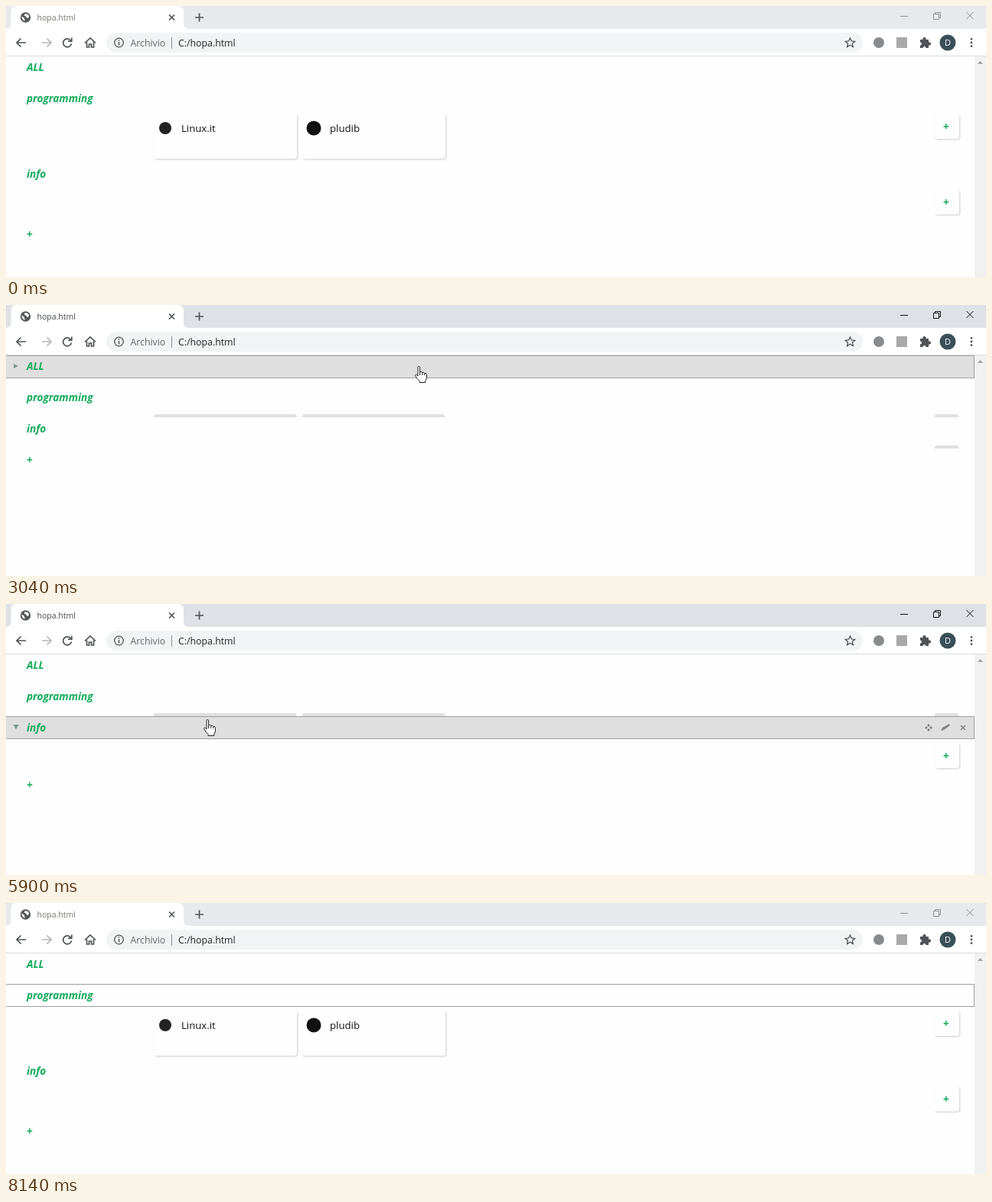
Write an HTML page that moves like this. It is 1280 by 355 pixels and loops after 8.33 s.

```html
<!DOCTYPE html>
<html lang="it">
<head>
<meta charset="utf-8">
<title>hopa.html</title>
<style>
  html, body { margin: 0; width: 100%; height: 100%; overflow: hidden; background: #fefefe; }
  #stage { display: block; width: 100vw; height: 100vh; font-family: "Open Sans", "Noto Sans", sans-serif; }
  .label, .plus { font-size: 13.6px; font-weight: 700; fill: #13ab5b; }
  .label { font-style: italic; }
  .plus { text-anchor: middle; }
  .card { fill: #fefefe; filter: drop-shadow(1px 1px 1px #ccc); }
  .name { font-size: 13.2px; fill: #111; }
  .url { font-size: 12.3px; }
  .line { fill: none; stroke: #505357; stroke-width: 1.7; }
  .thin { fill: none; stroke-width: 1; }
  .focus { fill: none; stroke: #a0a0a0; }
</style>
</head>
<body>
<svg id="stage" viewBox="0 0 1280 355" preserveAspectRatio="none">
  <rect width="1280" height="355" fill="#fefefe"/>

  <rect id="titlebar" width="1280" height="30"/>
  <path d="M0 30Q6.500 30 6.500 23V7Q6.500 0 14 0H224Q232 0 232 7V23Q232 30 239 30Z" fill="#fff"/>
  <circle cx="25.500" cy="15" r="6.700" fill="#55585c"/>
  <path d="M20 13.500L23.500 15.500L25 19.500L22 18.500ZM25 10L29.500 11.500L30 15L27.500 16L26 13.500L23.500 12.500Z" fill="#fff"/>
  <text id="tabTitle" x="40.500" y="18.800" font-size="10.500">hopa.html</text>
  <path class="line" d="M213 11.500l7 7m0-7l-7 7M247 15h11m-5.500-5.500v11"/>
  <path id="controls" class="thin" d="M1168 13.500h10M1211.500 10.500h7v7h-7zM1213.500 10.500v-2h7v7h-2M1254.500 8l9 9m0-9l-9 9"/>

  <rect y="30" width="1280" height="35" fill="#fff"/>
  <rect y="65" width="1280" height="1" fill="#dadce0"/>
  <path class="line" d="M26 48H14m5.500-5.500L14 48l5.500 5.500"/>
  <path class="line" d="M47 48h12m-5.500-5.500L59 48l-5.500 5.500" stroke="#aaadb0" style="stroke:#b4b7ba"/>
  <path class="line" d="M84.500 45A5.500 5.500 0 1 0 85.500 49.500M85.800 41.500v4.700h-4.700M103 48.500L110 42l7 6.500M105.500 47.500v6.500h3v-4h3v4h3v-6.500"/>
  <rect x="131" y="35" width="988" height="26" rx="13" fill="#f1f3f4"/>
  <circle class="line" cx="147.500" cy="48" r="5.800" style="stroke-width:1.300"/>
  <path class="line" d="M147.500 47v4.500M147.500 44.300v1.500" style="stroke-width:1.500"/>
  <text class="url" x="162.500" y="52.500" fill="#63666a">Archivio</text>
  <rect x="216" y="41" width="1" height="15" fill="#8c8f93"/>
  <text class="url" x="225" y="52.500" fill="#202124">C:/hopa.html</text>
  <path class="line" d="M1102.500 42l1.800 4 4.400.4-3.300 2.900 1 4.300-3.900-2.300-3.900 2.300 1-4.300-3.300-2.900 4.400-.4z" style="stroke-width:1.300"/>
  <circle cx="1140" cy="48" r="7" fill="#888b8e"/>
  <rect x="1163" y="41" width="14" height="14" fill="#a9a9a9"/>
  <path d="M1194 44h3.500a2.200 2.200 0 1 1 4 0h3.500v3.500a2.200 2.200 0 1 1 0 4V55h-3.500a2 2 0 1 0-4 0H1194v-3.500a2 2 0 1 0 0-4z" fill="#505357"/>
  <circle cx="1230" cy="48" r="10.500" fill="#395058"/>
  <text x="1230" y="52" font-size="11" text-anchor="middle" fill="#fff">D</text>
  <path d="M1261 43.300v.01M1261 48v.01M1261 52.700v.01" stroke="#505357" stroke-width="2.800" stroke-linecap="round"/>

  <g id="page"></g>

  <rect x="1265" y="66" width="15" height="289" fill="#f1f1f1"/>
  <path d="M1269 76l3.500-4 3.500 4z" fill="#a3a3a3"/>
  <g id="cursor" fill="#fff" stroke="#222" stroke-linejoin="round">
    <path id="hand" d="M4 13V1.800Q4 .5 5.300 .5T6.600 1.800V7.600Q9.200 6.900 9.700 8.500Q12 7.600 12.700 9.400Q15.500 9 15.500 11.600V15Q15.500 17 13.800 19V21.500H6V19.500Q3.500 17.500 .8 13Q.3 11.400 1.500 11.100Q2.700 11 4 13ZM6.600 7.600V12M9.700 8.500V12M12.700 9.400V12"/>
    <path id="arrow" d="M.5 .5V16.500L4.200 13L6.600 18.500L9 17.500L6.600 12.200H11.800Z"/>
  </g>
</svg>
<script>
const LOOP = 8330;
const TICKS = [0, 1620, 1820, 2030, 2230, 2430, 2630, 2820, 3040, 4460, 4670, 4860, 5060,
  5480, 5690, 5900, 6080, 6280, 6500, 6710, 6920, 7120, 7320, 7520, 7720, 8140];

// Tracks are [time, value...] points, joined linearly.
const HOVER = {
  all: [[2062, 0], [2300, 1], [4320, 1], [4560, 0]],
  programming: [[4430, 0], [4640, .87], [4850, 0], [6060, 0], [6300, 1], [7000, 1], [7240, 0]],
  info: [[4650, 0], [4860, 1], [5960, 1], [6200, 0]]
};
const FOCUS = { all: [2820, 5690], info: [5690, 6710], programming: [6710, LOOP] };
const OPEN = {
  programming: [[2640, 1], [2900, 0], [6720, 0], [6944, 1]],
  info: [[2640, 1], [2900, 0], [5700, 0], [5924, 1]]
};
const POINTER = [[1620, 590, 235], [1820, 556, 150], [2030, 536, 98], [2230, 534, 80], [4250, 534, 80],
  [4460, 453, 121], [4670, 345, 150], [4860, 280, 168], [5060, 268, 170], [5270, 268, 170],
  [5480, 262, 160], [5690, 258, 151], [5900, 258, 151], [6080, 257, 133], [6280, 257, 130],
  [6920, 257, 130], [7120, 262, 190], [7320, 285, 282]];

const $ = id => document.getElementById(id);
const within = (t, [from, to]) => t >= from && t < to;

function at(track, t) {
  const next = track.findIndex(point => point[0] > t);
  if (next < 0) return track[track.length - 1].slice(1);
  if (next === 0) return track[0].slice(1);
  const a = track[next - 1], b = track[next];
  const k = (t - a[0]) / (b[0] - a[0]);
  return a.slice(1).map((v, i) => v + (b[i + 1] - v) * k);
}

const TOOLS = `<path fill="#858585" d="M1205 10l2 2-2 2-2-2zM1205 16l2 2-2 2-2-2zM1202 13l2 2-2 2-2-2zM1208 13l2 2-2 2-2-2zM1221 19l2-4 9-5 1 2-8 6z"/>
  <path d="M1247 12l6 6m0-6l-6 6" stroke="#858585" stroke-width="1.700"/>`;

const row = (id, label, baseline, tools = '') => `<g id="${id}">
  <g id="${id}Hover"><rect width="1265" height="29" fill="#dfdfdf"/>
    <path id="${id}Marker" fill="#829a8b"/>${tools}</g>
  <rect id="${id}Focus" class="focus" x="-.5" y=".5" width="1265" height="29"/>
  <text class="label" x="27" y="${baseline}">${label}</text></g>`;

const card = (x, color, r, name) => `<rect class="card" x="${x}" width="187" height="58" rx="3"/>
  <circle cx="${x + 15}" cy="18" r="${r}" fill="${color}"/>
  <text class="name" x="${x + 36}" y="23">${name}</text>`;

const bar = (x, w) => `<path d="M${x + w} 3h2v2h-2z" fill="#f3f3f3"/>
  <path d="M${x} 5V4Q${x} 1 ${x + 3} 1H${x + w - 3}Q${x + w} 1 ${x + w} 4V5Z" fill="#e0e0e0"/>`;

const panel = (id, cards, bars) => `<svg id="${id}Panel" width="1265">
  <g id="${id}Cards">${cards}<rect class="card" x="1213" width="32" height="32" rx="3"/>
    <text class="plus" x="1228" y="21">+</text></g>
  <g id="${id}Bars">${bars}${bar(1213, 31)}</g></svg>`;

$('page').innerHTML =
  panel('programming', card(193, '#222', 8, 'Linux.it') + card(387, '#111', 9.5, 'pludib'),
    bar(193, 186) + bar(387, 186)) +
  panel('info', '', '') +
  row('all', 'ALL', 19) + row('programming', 'programming', 20, TOOLS) + row('info', 'info', 20, TOOLS) +
  '<text id="add" class="plus" x="31">+</text>';

const show = (id, visible) => $(id).setAttribute('visibility', visible ? 'visible' : 'hidden');

function drawRow(id, top, t, opened) {
  $(id).setAttribute('transform', `translate(0 ${top})`);
  $(id + 'Hover').setAttribute('opacity', at(HOVER[id], t)[0]);
  $(id + 'Marker').setAttribute('d', opened ? 'M9.500 11h7l-3.500 6.500z' : 'M10 11v6l6-3z');
  show(id + 'Focus', within(t, FOCUS[id]));
}

function drawPanel(id, top, open, fullHeight) {
  $(id + 'Panel').setAttribute('y', top + 36);
  $(id + 'Panel').setAttribute('height', 5 + fullHeight * open);
  show(id + 'Cards', open > 0);
  show(id + 'Bars', open === 0);
}

function draw(t) {
  const active = within(t, [2630, 8140]);
  $('titlebar').setAttribute('fill', active ? '#dee1e6' : '#e7eaed');
  $('tabTitle').setAttribute('fill', active ? '#45484b' : '#74766f');
  $('controls').setAttribute('stroke', active ? '#111' : '#8c8f93');

  const [programming] = at(OPEN.programming, t);
  const [info] = at(OPEN.info, t);
  const infoTop = 147 + 58 * programming;
  drawPanel('programming', 106, programming, 58);
  drawPanel('info', infoTop, info, 38);
  drawRow('all', 66, t, t < 2820);
  drawRow('programming', 106, t, programming > 0);
  drawRow('info', infoTop, t, info > 0);
  $('add').setAttribute('y', infoTop + 61 + 38 * info);

  const [x, y] = at(POINTER, t);
  const present = within(t, [1620, 7520]);
  const pointing = within(t, [2062, 7000]);
  $('cursor').setAttribute('transform', `translate(${x} ${y})`);
  show('hand', present && pointing);
  show('arrow', present && !pointing);
}

let shown = -1;
function frame() {
  const now = performance.now() % LOOP;
  const tick = TICKS.filter(time => time <= now).pop();
  if (tick !== shown) draw(shown = tick);
  requestAnimationFrame(frame);
}
frame();
</script>
</body>
</html>
```
